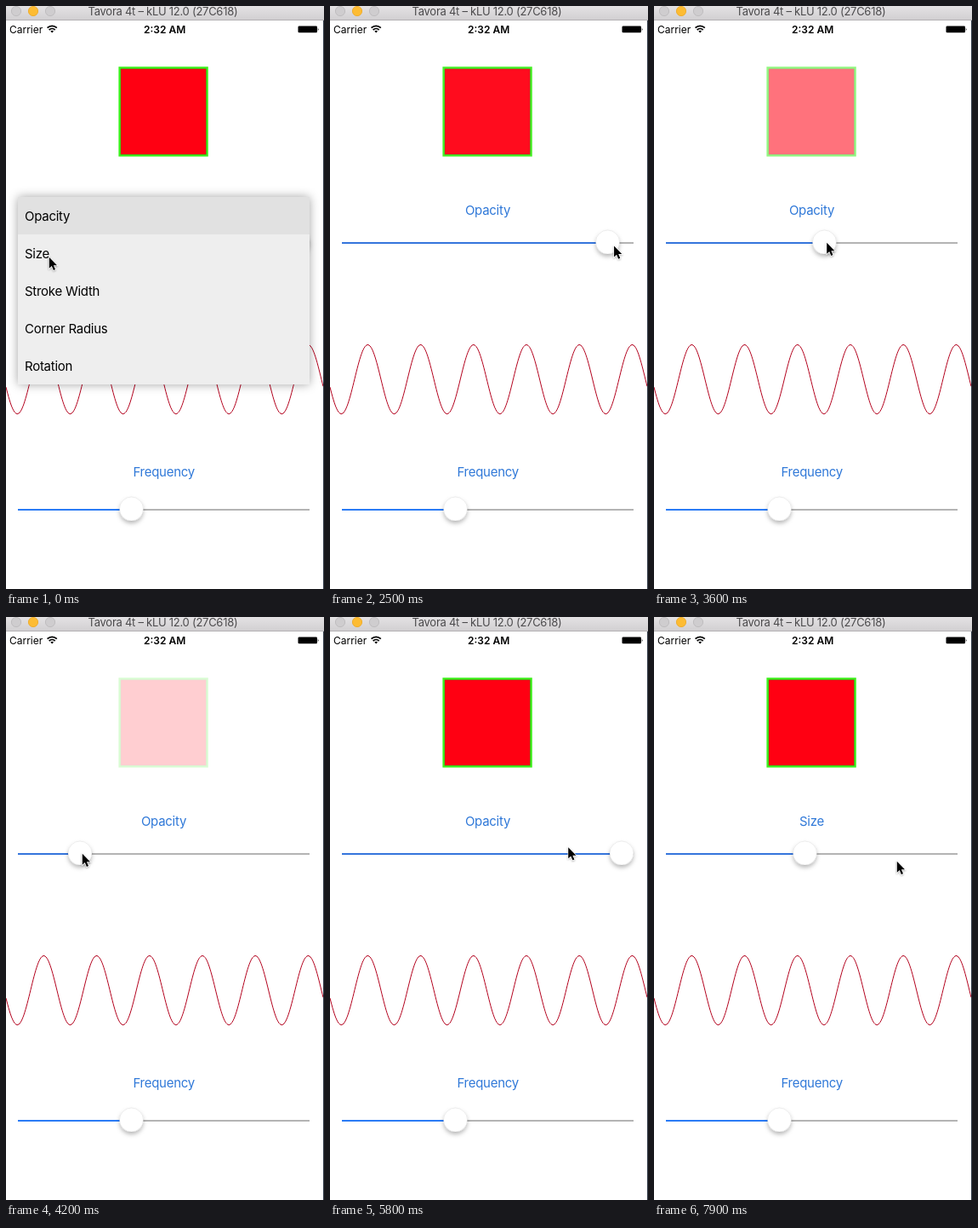
An HTML page that plays this animation: 374x684 px, repeating every 8000 ms.

```html
<!DOCTYPE html>
<html lang="en">
<head>
<meta charset="utf-8">
<title>Slider playground</title>
<style>
  html, body { margin: 0; width: 100%; height: 100%; overflow: hidden; background: #fff; }
  svg { display: block; width: 374px; height: 684px; }
  text { font: 15px Inter, "Liberation Sans", sans-serif; letter-spacing: -.27px; }
  .mid { text-anchor: middle; }
  .label { fill: #2f78d8; }
  .title { font-size: 13px; fill: #4b4a4c; }
  .status { font-size: 12px; letter-spacing: 0; }
  .clock { font-weight: 600; }
  .track { stroke: #b4b4b4; stroke-width: 2; }
</style>
</head>
<body>
<svg viewBox="0 0 374 684">
  <defs>
    <linearGradient id="bar" x2="0" y2="1">
      <stop stop-color="#e4e2e4"/><stop offset="1" stop-color="#d0ced0"/>
    </linearGradient>
    <filter id="thumbShadow" x="-50%" y="-50%" width="200%" height="200%">
      <feDropShadow dx="0" dy="3" stdDeviation="2.6" flood-opacity=".27"/>
    </filter>
    <filter id="menuShadow" x="-10%" y="-15%" width="120%" height="130%">
      <feDropShadow dx="0" dy="0" stdDeviation="6" flood-opacity=".36"/>
    </filter>
    <filter id="cursorShadow" x="-50%" y="-50%" width="200%" height="200%">
      <feDropShadow dx="0" dy="1" stdDeviation=".8" flood-opacity=".35"/>
    </filter>
    <g id="thumb">
      <circle r="14" fill="#fff" filter="url(#thumbShadow)"/>
      <circle r="14" fill="none" stroke="#000" stroke-opacity=".12" stroke-width=".6"/>
    </g>
  </defs>

  <rect width="374" height="684" fill="#fff"/>
  <rect width="374" height="17" fill="url(#bar)"/>
  <path d="M0 16.5H374" stroke="#b3b1b3"/>
  <g fill="#cfcdcf" stroke="#bfbdbf">
    <circle cx="12" cy="6" r="5.6"/>
    <circle cx="32" cy="6" r="5.6" fill="#fdbc33" stroke="#eeae30"/>
    <circle cx="52" cy="6" r="5.6"/>
  </g>
  <text class="title mid" x="184.5" y="11">Tavora 4t – kLU 12.0 (27C618)</text>

  <text class="status" x="4" y="31.5">Carrier</text>
  <g fill="none" stroke="#000" stroke-width="1.8">
    <path d="M48.6 25.6a8 8 0 0 1 11.2 0M50.7 28a5 5 0 0 1 7 0"/>
    <path d="M52.4 29.6a2.7 2.7 0 0 1 3.6 0L54.2 31.6Z" fill="#000" stroke="none"/>
  </g>
  <text class="status clock mid" x="186.7" y="31.5">2:32 AM</text>
  <rect x="343.5" y="23.5" width="22.5" height="7.8" rx="1.3"/>
  <path d="M366.8 25.8q1.8 1.7 0 3.4Z"/>

  <g id="square">
    <rect x="133.7" y="72.5" width="102.8" height="102.8" fill="#ff0012" stroke="#3df01c" stroke-width="2.6"/>
    <rect x="135" y="73.8" width="100.4" height="100.4" fill="none" stroke="#4a5a10" stroke-opacity=".5" stroke-width=".7"/>
  </g>

  <text id="label" class="label mid" x="185.5" y="244.8"></text>
  <path class="track" d="M14 278H357"/>
  <path id="fill" stroke="#3575dc" stroke-width="2"/>
  <use id="knob" href="#thumb"/>

  <path id="wave" fill="none" stroke="#b3001c"/>

  <text class="label mid" x="185.7" y="552">Frequency</text>
  <path class="track" d="M14 591H357"/>
  <path d="M14 591H147" stroke="#2b7bf5" stroke-width="2"/>
  <use href="#thumb" x="147.5" y="590"/>

  <g id="menu">
    <rect x="14" y="224" width="343" height="220" rx="2" fill="#eee" filter="url(#menuShadow)"/>
    <rect id="selected" x="14" width="343" height="44" fill="#e1e1e1"/>
    <g id="rows"></g>
  </g>

  <path d="M373.5 17V684" stroke="#303a48"/>
  <g id="cursor">
    <path d="M.8 .8v13l3 -2.8l2.1 4.9l2.1 -.9l-2.1 -4.7h4.1Z" stroke="#fff" stroke-width="1.2"
          paint-order="stroke" filter="url(#cursorShadow)"/>
  </g>
</svg>
<script>
const LOOP = 8000, STEP = 100, FADE = 230;
const MIN_X = 28, MAX_X = 343, SIZE_X = 177.5, DRAG_Y = 277, GRIP = 2;
const ROW = 44, MENU_TOP = 224;
const OPTIONS = ['Opacity', 'Size', 'Stroke Width', 'Corner Radius', 'Rotation'];
const $ = id => document.getElementById(id);

const move = (start, end, x, y) => ({ start, end, x, y });
const drag = (start, end, x) => ({ start, end, x: x + GRIP, y: DRAG_Y, knobX: x });

// Pointer script: pick Opacity, scrub the slider, reopen the menu, pick Size
const GESTURES = [
  move(0, 300, 41, 288),
  move(700, 1000, 46, 245),
  move(1500, 2000, 350, 281),
  drag(2400, 3100, 46),
  drag(3100, 3400, 280),
  drag(3450, 3830, 49),
  drag(3900, 4200, 87),
  drag(4500, 4900, MIN_X),
  drag(5030, 5630, MAX_X),
  move(5630, 5900, 250, 266),
  move(6100, 6500, 207.5, 240),
  move(6900, 7200, 130, 284),
  move(7400, 7900, 285, 286)
];
const DRAGS = GESTURES.filter(g => 'knobX' in g);
const OPEN = 6600, CLOSES = [1000, 7200];

function ease(t, start, end) {
  const p = Math.min(1, Math.max(0, (t - start) / (end - start)));
  return p * p * (3 - 2 * p);
}

const follow = (list, key, from, t) =>
  list.reduce((v, g) => v + (g[key] - v) * ease(t, g.start, g.end), from);

const fade = (t, start) => ease(t, start, start + FADE);

function wavePath() {
  const points = [];
  for (let x = 0; x <= 373; x++) {
    const y = 438 - 40.5 * Math.cos(2 * Math.PI * (x - 44.4) / 62.2);
    points.push(`${x} ${y.toFixed(2)}`);
  }
  return 'M' + points.join('L');
}

function draw(t) {
  const sizing = t > CLOSES[1];
  const opacityX = follow(DRAGS, 'knobX', MAX_X, t);
  const knobX = sizing ? SIZE_X : opacityX;
  $('square').setAttribute('opacity', (opacityX - MIN_X) / (MAX_X - MIN_X));
  $('label').textContent = OPTIONS[sizing ? 1 : 0];
  $('fill').setAttribute('d', `M14 278H${knobX}`);
  $('knob').setAttribute('transform', `translate(${knobX} 277)`);

  const shown = 1 + fade(t, OPEN) - fade(t, CLOSES[0]) - fade(t, CLOSES[1]);
  $('menu').setAttribute('opacity', shown);
  $('menu').setAttribute('transform', `translate(185.5 334) scale(${.9 + .1 * shown}) translate(-185.5 -334)`);
  $('selected').setAttribute('y', MENU_TOP + (sizing ? ROW : 0));

  const x = follow(GESTURES, 'x', 50, t), y = follow(GESTURES, 'y', 294, t);
  $('cursor').setAttribute('transform', `translate(${x} ${y})`);
}

function tick(now) {
  draw(Math.floor(now % LOOP / STEP) * STEP);
  requestAnimationFrame(tick);
}

$('wave').setAttribute('d', wavePath());
$('rows').innerHTML = OPTIONS.map((name, i) =>
  `<text x="22" y="${MENU_TOP + ROW * i + 27.6}">${name}</text>`).join('');
draw(0);
requestAnimationFrame(tick);
</script>
</body>
</html>
```
